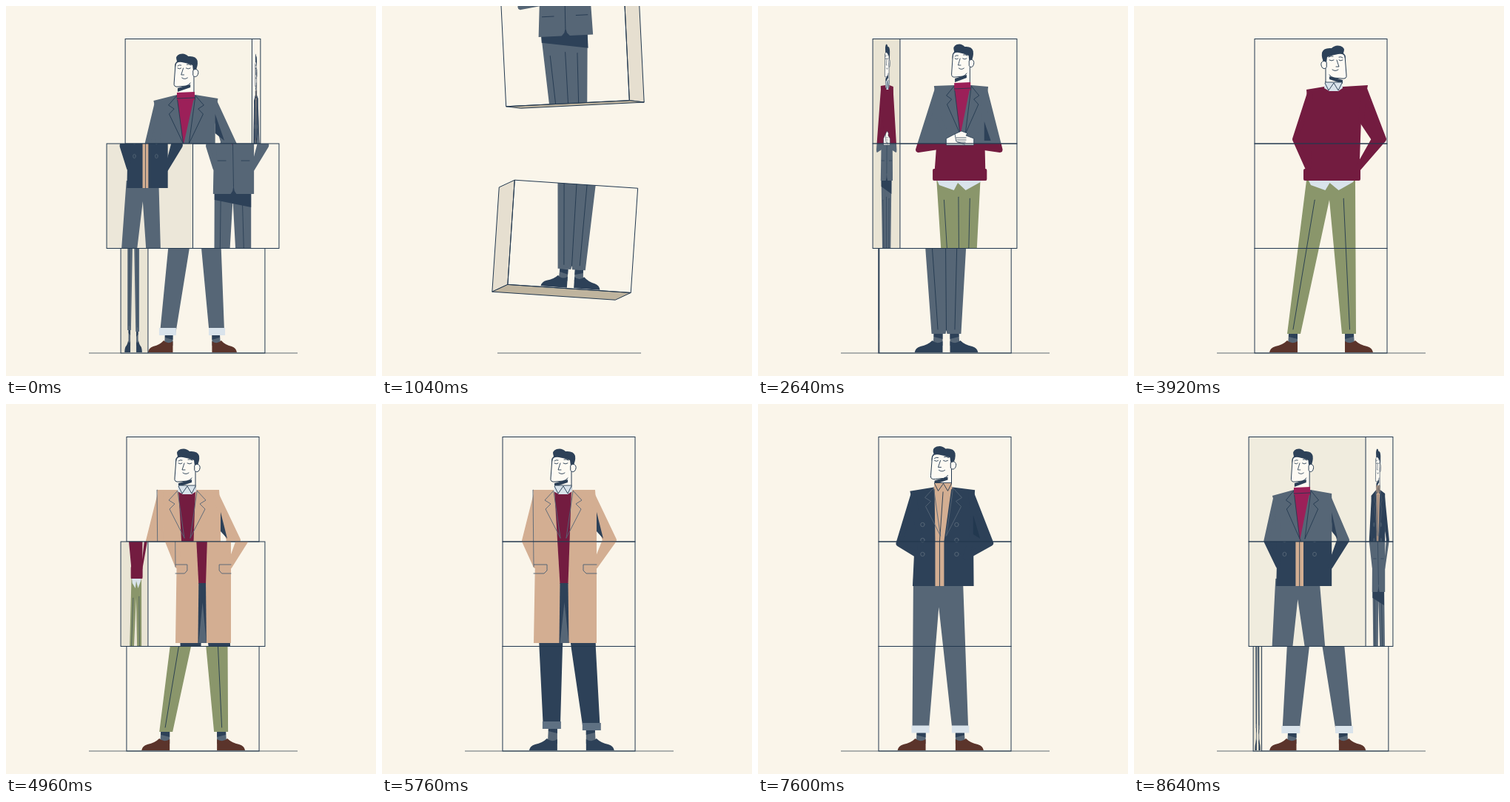
Animation, 500 px wide and 500 px high, one loop 8.72 s. Source, as an HTML page with a canvas:

```html
<!DOCTYPE html>
<html lang="en">
<head>
<meta charset="utf-8">
<title>Wardrobe boxes</title>
<style>
html, body { margin: 0; width: 100%; height: 100%; overflow: hidden; background: #faf5ea; }
canvas { display: block; width: 500px; height: 500px; }
</style>
</head>
<body>
<canvas id="stage"></canvas>
<script>
const canvas = document.getElementById('stage');
const ctx = canvas.getContext('2d');
const dpr = window.devicePixelRatio || 1;
canvas.width = canvas.height = 500 * dpr;

const LOOP = 8720, STEP = 80, TURN = 900;
const LEFT = 163, WIDTH = 179, MID = 252.5, TALL = 141.5;
const BG = '#faf5ea', SKIN = '#fdfaf3', INK = '#22384f', NAVY = '#2d4158', GRAY = '#566676',
  WINE = '#731c40', PINK = '#9c2059', GREEN = '#8a966b', CAMEL = '#d3ae92', BROWN = '#5b342b', PALE = '#d9e3eb';

// Outfits in wearing order: suit, sweater, coat, peacoat
const outfits = [
  { top: GRAY, legs: GRAY, shoe: NAVY, hem: 243, crease: true, neck: 'roll', draw: suit },
  { top: WINE, legs: GREEN, shoe: BROWN, hem: 234, crease: true, neck: 'shirt', draw: sweater },
  { top: CAMEL, legs: NAVY, shoe: NAVY, hem: 323, cuff: '#5f7183', neck: 'shirt', draw: coat },
  { top: NAVY, legs: GRAY, shoe: BROWN, hem: 246, cuff: PALE, neck: 'open', draw: peacoat }
];

const rows = [
  { y: 44.5, turns: [2720, 4400, 6560, 8560], dir: 1, jump: [460, 1960, 320], tilt: 3, depth: [-20, 6] },
  { y: 186, turns: [2560, 4880, 6800, 8720], dir: -1, jump: [480, 1840, 202], tilt: -2.9, depth: [20.5, 2.5] },
  { y: 327.5, turns: [2960, 5360, 7040, 8800], dir: 1, jump: [540, 1720, 89], tilt: 3.9, depth: [-21.5, 10] }
];

// Joints: s shoulder, e elbow, w wrist, i inner elbow, j armpit, h hem, q waist; l/r side
const apart = {
  head: [243, 80], sl: [204, 116], sr: [288, 116], el: [193, 185], er: [313, 184],
  wl: [208, 218], wr: [288, 219], il: [209, 192], ir: [302, 184], jl: [208, 150], jr: [290, 146],
  hl: [205, 0], hr: [290, 0], ql: [208, 236], qr: [284, 236], crotch: [246, 262],
  la: [218, 438], lb: [241, 438], ra: [272, 440], rb: [295, 440]
};
const sloping = { ...apart, sl: [199, 124], sr: [290, 121], el: [190, 185] };
const wide = {
  ...sloping, ql: [204, 236], qr: [271, 236], crotch: [238, 264],
  la: [192, 444], lb: [216, 444], ra: [268, 444], rb: [291, 444]
};
const leaning = {
  ...apart, head: [272, 73], sl: [233, 113], sr: [316, 107], el: [218, 180], er: [337, 180],
  wl: [235, 218], wr: [303, 219], il: [236, 194], ir: [325, 180], jl: [236, 150], jr: [307, 153],
  hl: [231, 0], hr: [304, 0], ql: [233, 236], qr: [299, 236], crotch: [264, 262],
  la: [207, 443], lb: [225, 443], ra: [281, 443], rb: [300, 443]
};
const together = {
  head: [257, 71], sl: [215, 108], sr: [298, 109], el: [191, 194], er: [316, 194],
  wl: [236, 188], wr: [269, 188], il: [236, 178], ir: [269, 178], jl: [222, 150], jr: [292, 156],
  hl: [215, 0], hr: [294, 0], ql: [219, 236], qr: [286, 236], crotch: [254, 438],
  la: [234, 443], lb: [253, 443], ra: [255, 443], rb: [274, 443]
};
const stances = [sloping, leaning, apart, wide];

const clamp = v => Math.max(0, Math.min(1, v));
const mix = (a, b, k) => a + (b - a) * k;
const span = (t, a, b) => clamp((t - a) / (b - a));
const half = u => u <= 0 ? 0 : Math.pow(2, 20 * u - 11);
const expo = u => u < .5 ? half(u) : 1 - half(1 - u);
const smooth = u => u * u * (3 - 2 * u);
const ramp = (t, a, b) => smooth(span(t, a, b));

function closeness(t) {
  return ramp(t, 350, 800) - ramp(t, 2880, 3440) + ramp(t, 5800, 6160) - ramp(t, 7280, 7840);
}

function makePose(n, t) {
  const k = closeness(t), from = stances[n], pose = { k };
  for (const key in from) pose[key] = from[key].map((v, i) => mix(v, together[key][i], k));
  pose.crotch[1] = mix(from.crotch[1], together.crotch[1], k ** 3);
  // Crouch before the jump
  const dip = t < 600 ? 1 - ramp(t, 80, 480) : ramp(t, 8640, LOOP);
  for (const key of ['head', 'sl', 'sr', 'el', 'er']) {
    pose[key][0] += 4 * dip;
    pose[key][1] += 4 * dip;
  }
  for (const key of ['la', 'lb', 'ra', 'rb']) pose[key][0] -= 11 * dip;
  pose.flip = n === 1 && k < .5 ? -1 : 1;
  pose.cx = pose.head[0] + 2 * pose.flip;
  pose.top = pose.head[1] + 36;
  return pose;
}

function poly(points, fill, stroke, width = 1) {
  ctx.beginPath();
  points.forEach(p => ctx.lineTo(p[0], p[1]));
  ctx.closePath();
  paint(fill, stroke, width);
}
function paint(fill, stroke, width = 1) {
  ctx.lineWidth = width;
  if (fill) { ctx.fillStyle = fill; ctx.fill(); }
  if (stroke) { ctx.strokeStyle = stroke; ctx.stroke(); }
}
function line(points, color = INK, width = .9) {
  ctx.beginPath();
  points.forEach(p => ctx.lineTo(p[0], p[1]));
  paint(null, color, width);
}
function shape(d, fill, stroke, width = 1) {
  const path = new Path2D(d);
  if (fill) { ctx.fillStyle = fill; ctx.fill(path); }
  if (stroke) { ctx.strokeStyle = stroke; ctx.lineWidth = width; ctx.stroke(path); }
}
function at(x, y, sx, fn) {
  ctx.save();
  ctx.translate(x, y);
  ctx.scale(sx, 1);
  fn();
  ctx.restore();
}

function drawHead(p) {
  at(p.head[0], p.head[1], p.flip, () => {
    shape('M-9 24L-9 40H13V4L10-12H-11L-13-6-15 20Q-16 26-9 25Z', SKIN);
    shape('M-10 27L8 22V26L-10 32Z', NAVY);
    shape('M13 37V6M-13-6L-15 20Q-16 26-9 25L2 24Q6 23 8 20', null, INK);
    shape('M-14 1Q-14-8-11-9Q-14-17-7-19Q0-21 5-16Q16-17 18-10Q19-3 15 4L12 4 11-4Q3-7-4-8Q-10-9-12-6Z', NAVY);
    shape('M12 3C16-1 20 3 19 7C18 12 14 13 12 10Z', SKIN, INK);
    shape('M-10-3Q-8-5-5-4M3-5Q6-6 9-4M-10 0Q-7 2-5 0M2 0Q5 2 8 0M-2 0L-5 9H-1M-4 13Q0 16 4 13', null, INK, .9);
  });
}

function drawCollar(p, kind) {
  const x = p.cx, y = p.top;
  if (kind === 'roll') {
    poly([[x - 13, y - 3], [x + 12, y - 4], [x + 12, y + 7], [x - 13, y + 7]], PINK);
    line([[x - 13, y + 5], [x + 12, y + 4]]);
  } else {
    const fill = kind === 'shirt' ? PALE : CAMEL;
    poly([[x - 12, y - 6], [x + 11, y - 6], [x + 12, y + 2], [x + 6, y + 6], [x - 6, y + 6], [x - 13, y + 2]], fill);
    line([[x - 12, y - 5], [x - 7, y + 5], [x, y - 5], [x + 6, y + 5], [x + 11, y - 5]]);
    line([[x - 12, y - 6], [x + 11, y - 6]]);
  }
}

function drawLegs(p, o) {
  const crotch = [p.crotch[0], Math.min(p.crotch[1], p.lb[1])];
  poly([p.ql, p.qr, p.rb, p.ra, crotch, p.lb, p.la], o.legs);
  if (o.crease) {
    const w = p.qr[0] - p.ql[0];
    line([[p.ql[0] + w * .17, 262], [(p.la[0] + p.lb[0]) / 2 - 1, p.la[1] - 6]]);
    line([[p.qr[0] - w * .24, 260], [(p.ra[0] + p.rb[0]) / 2 + 1, p.ra[1] - 6]]);
    if (p.k > .2) line([[(p.ql[0] + p.qr[0]) / 2, 258], crotch]);
  }
  drawFoot(p.lb, p.la, -1, o);
  drawFoot(p.ra, p.rb, 1, o);
}

function drawFoot(inner, outer, side, o) {
  at(inner[0] + side * 4, 468, side, () => {
    const high = inner[1] - 468;
    poly([[0, high], [12, high], [13, -9], [0, -9]], GRAY);
    poly([[0, high], [12, high], [12, high + 4], [0, high + 7]], NAVY);
    shape('M0-15Q8-10 14-16Q20-10 30-8Q37-6 38 0H0Z', o.shoe);
  });
  if (o.cuff) {
    const y = inner[1];
    poly([[inner[0] - side, y - 9], [outer[0] + side, y - 9], [outer[0] + side, y + 1], [inner[0] - side, y + 1]], o.cuff);
  }
}

function drawLapels(p, ink, low) {
  const x = p.cx, y = p.top;
  for (const s of [-1, 1]) {
    line([[x + s * 13, y + 1], [x + s * 25, y + 14], [x + s * 17, y + 19], [x + s * 24, y + 26], [x + s * 4, low]], ink);
    line([[x + s * 13, y + 2], [x + s * 4, low]], ink);
  }
}

function suit(p, hem) {
  const x = p.cx, y = p.top, m = (p.hl[0] + p.hr[0]) / 2;
  poly([[x - 13, y], [x + 12, y], [x - 4, y + 69]], PINK);
  drawLapels(p, INK, y + 66);
  line([[x - 3, y + 67], [m, hem - 10]], INK);
  poly([[m - 7, hem + 1], [m - 2, hem - 4], [m, hem - 11], [m + 2, hem - 4], [m + 7, hem + 1]], NAVY);
  for (const s of [-1, 1]) line([[m + s * 16, 209], [m + s * 33, 209]]);
}

function sweater() {}

function coat(p) {
  const x = p.cx, y = p.top, m = mix(x, (p.hl[0] + p.hr[0]) / 2, .6);
  poly([[x - 12, y], [x + 11, y], [m + 5, 243], [m - 6, 243]], WINE);
  poly([[m - 6, 242], [m + 5, 242], [m + 6, 323], [m - 7, 323]], NAVY);
  poly([[m, 268], [m + 6, 323], [m - 6, 323]], GRAY);
  drawLapels(p, GRAY, y + 65);
  line([p.sl, [p.hl[0], 220]], GRAY);
  const pocket = (edge, s) => line([[edge, 217], [edge + s * 18, 217], [edge + s * 18, 225], [edge + s * 14, 229], [edge, 229]], GRAY, 1);
  pocket(p.hl[0], 1);
  pocket(p.hr[0], -1);
}

function peacoat(p) {
  const x = p.cx, y = p.top;
  const m = mix(x, (p.hl[0] + p.hr[0]) / 2, .3) - 5;
  poly([[x - 12, y], [x + 11, y], [m + 6, 185], [m + 6, 246], [m - 6, 246], [m - 6, 185]], CAMEL);
  line([[x, y], [m, 186], [m, 246]]);
  drawLapels(p, GRAY, 178);
  for (const cy of [163, 184, 203]) for (const s of [-1, 1]) {
    ctx.beginPath();
    ctx.arc(m + s * 23, cy, 2.7, 0, 7);
    paint(null, GRAY);
  }
}

function drawHands(p) {
  if (p.k < .6) return;
  at(p.cx - 5, 175, 1, () => {
    shape('M-20 4L-7-2 3-6 12-3 10 0 22 4V13H-20Z', SKIN, INK, .8);
    shape('M-7-2L-5 8 8 12M-5 3H10M-4 6H10M-3 9H9', null, INK, .8);
  });
}

function drawArm(shoulder, joints, color, side) {
  const inset = [shoulder[0] + side * 5, shoulder[1] + 5];
  poly([inset, ...joints], color, color, 8);
}

function drawFigure(n, t) {
  const p = makePose(n, t), o = outfits[n];
  const hem = n === 0 ? mix(254, 236, p.k) : o.hem;
  const hl = [p.hl[0], hem], hr = [p.hr[0], hem];
  ctx.lineJoin = ctx.lineCap = 'round';
  drawLegs(p, o);
  if (n === 0) poly([[p.ql[0], hem - 4], [p.qr[0], hem - 4], [p.qr[0], hem + 18], [p.ql[0], hem + 8]], NAVY);
  if (n === 1) {
    const m = (hl[0] + hr[0]) / 2;
    poly([[hl[0] + 3, 232], [hr[0] - 5, 232], [hr[0] - 8, 238], [m + 9, 249], [m - 3, 239], [m - 9, 249], [hl[0] + 8, 242]], PALE);
  }
  drawHead(p);
  const neck = [[p.cx - 13, p.top], [p.cx + 13, p.top]];
  poly([p.sl, ...neck, p.sr, p.jr, hr, hl, p.jl], o.top);
  drawArm(p.sl, [p.el, p.wl, p.il, p.jl], o.top, 1);
  drawArm(p.sr, [p.er, p.wr, p.ir, p.jr], o.top, -1);
  if (n === 1) poly([[hl[0], 222], [hr[0], 222], hr, hl], o.top, o.top, 4);
  else poly([p.jr, [p.er[0] - 14, 182], [p.jr[0], p.jr[1] + 26]], n === 3 ? INK : NAVY);
  o.draw(p, hem);
  drawCollar(p, o.neck);
  drawHands(p);
}

function drawFace(row, n, t, x, w, shade) {
  if (w < .5) return;
  ctx.save();
  ctx.translate(x, 0);
  ctx.scale(w / WIDTH, 1);
  ctx.translate(-LEFT, 0);
  if (shade) {
    ctx.globalAlpha = shade;
    ctx.fillStyle = '#e8e3d3';
    ctx.fillRect(LEFT, row.y, WIDTH, TALL);
    ctx.globalAlpha = 1;
  }
  ctx.beginPath();
  ctx.rect(LEFT - 20, row.y, WIDTH + 40, TALL);
  ctx.clip();
  drawFigure(n, t);
  ctx.restore();
}

function drawTurning(row, t) {
  const s = t < 600 ? t + LOOP : t;
  const q = row.turns.reduce((sum, c) => sum + expo(span(s, c - TURN / 2, c + TURN / 2)), 0);
  const n = Math.floor(q), phi = (q - n) * 90, rad = phi * Math.PI / 180;
  const lean = Math.min(phi, 90 - phi);
  const k = 1 - (.1 - .02 * lean / 45) * Math.sin(Math.min(1, lean / 14) * Math.PI / 2);
  const oldW = WIDTH * k * Math.cos(rad), newW = WIDTH * k * Math.sin(rad);
  const x0 = MID - (oldW + newW) / 2;
  const oldN = n % 4, newN = (n + 1) % 4;
  const fromLeft = row.dir > 0;
  const leftW = fromLeft ? newW : oldW, rightW = fromLeft ? oldW : newW;
  const angle = fromLeft ? 90 - phi : phi;
  const shade = .45 * Math.min(1, angle / 14) + .55 * angle / 90;
  drawFace(row, fromLeft ? newN : oldN, t, x0, leftW, shade);
  drawFace(row, fromLeft ? oldN : newN, t, x0 + leftW, rightW, 0);
  ctx.strokeStyle = INK;
  ctx.lineWidth = 1;
  ctx.strokeRect(x0, row.y, leftW + rightW, TALL);
  if (lean > .3) line([[x0 + leftW, row.y], [x0 + leftW, row.y + TALL]], INK, 1);
}

function drawFlying(row, t, lift) {
  const a = lift / row.jump[2], rad = row.tilt * a * Math.PI / 180;
  const [dx, dy] = row.depth.map(v => v * a);
  const w = WIDTH * (1 - .07 * a);
  const c = Math.cos(rad), s = Math.sin(rad);
  const cx = MID - dx / 4, cy = row.y + TALL / 2 - lift;
  const spot = (x, y) => [cx + x * c - y * s, cy + x * s + y * c];
  const back = p => [p[0] + dx, p[1] + dy];
  const h = TALL / 2, side = Math.sign(dx) * w / 2;
  const bl = spot(-w / 2, h), br = spot(w / 2, h), st = spot(side, -h), sb = spot(side, h);
  poly([st, back(st), back(sb), sb], '#e6dfd0', INK);
  poly([bl, br, back(br), back(bl)], '#bfb49e', INK);
  ctx.save();
  ctx.translate(cx, cy);
  ctx.rotate(rad);
  ctx.translate(0, -row.y - h);
  drawFace(row, 0, t, -w / 2, w, 0);
  ctx.restore();
  poly([spot(-w / 2, -h), spot(w / 2, -h), br, bl], null, INK);
}

function liftOf(row, t) {
  const [a, b, peak] = row.jump, u = span(t, a, b);
  return peak * 4 * u * (1 - u);
}

function render(t) {
  ctx.setTransform(dpr, 0, 0, dpr, 0, 0);
  ctx.fillStyle = BG;
  ctx.fillRect(0, 0, 500, 500);
  const inset = 45 * liftOf(rows[2], t) / rows[2].jump[2];
  line([[112 + inset, 469], [394 - inset, 469]], '#5f6b72', 1);
  for (const row of rows) {
    const lift = liftOf(row, t);
    if (lift > 0) drawFlying(row, t, lift);
    else drawTurning(row, t);
  }
}

const start = performance.now();
function tick() {
  const t = (performance.now() - start) % LOOP;
  render(Math.floor(t / STEP) * STEP);
  requestAnimationFrame(tick);
}
tick();
</script>
</body>
</html>
```
